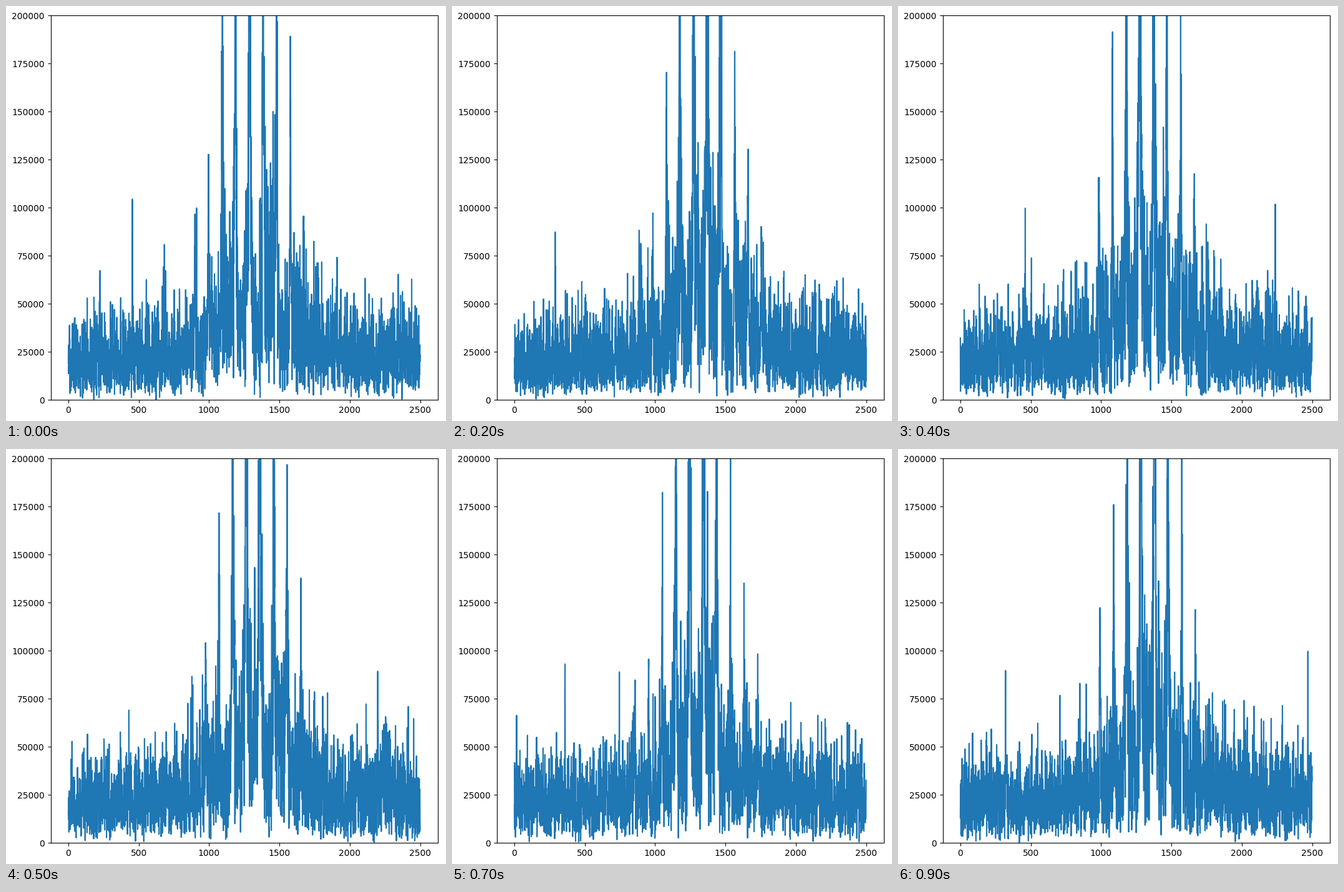
Recreate the animation shown at these times as a matplotlib script. Size 705 by 665 pixels, loop 1000 ms.

```python
import numpy as np
import matplotlib.pyplot as plt
from matplotlib.animation import FuncAnimation

WIDTH, HEIGHT, DPI = 705, 665, 100
STEPS = 10
BINS = 2500
SPACING = 96.8
HARMONICS = 10
STRAYS = 4
CENTER = 1330
LIMIT = 200_000
bins = np.arange(BINS)


def bell(x, center, width):
    return np.exp(-((x - center) / width) ** 2)


def pitch(step):
    """Bin of the lowest harmonic, gliding between a few turning points."""
    return np.interp(step, [0, 1, 3, 7, 9], [899, 877, 897, 858, 895])


def tones(step, rng):
    """Yield (bin, height, half-width) for the harmonics and a few stray tones."""
    for k in range(HARMONICS):
        position = pitch(step) + SPACING * k
        height = 75_000 + 420_000 * bell(position, CENTER, 220)
        yield round(position), height * rng.uniform(0.85, 1.15), 3.6
    for _ in range(STRAYS):
        yield rng.integers(BINS), rng.uniform(70_000, 105_000), 1.3


def spectrum(step):
    rng = np.random.default_rng(40 + step)
    sigma = 17_000 + 6_000 * bell(bins, 1500, 700) + 7_000 * bell(bins, CENTER, 220)
    signal = sigma * (rng.normal(size=BINS) + 1j * rng.normal(size=BINS))
    flutter = rng.uniform(0.3, 1, BINS)
    peaks = list(tones(step, rng))
    for center, height, width in peaks:
        phase = np.exp(2j * np.pi * rng.random())
        signal += height * flutter * phase / (1 + 1j * (bins - center) / width)
    level = np.abs(signal)
    for center, height, width in peaks:
        near = np.abs(bins - center) <= 3 * width
        level[near] = np.minimum(level[near], height)
        level[center] = height
    return level


fig = plt.figure(figsize=(WIDTH / DPI, HEIGHT / DPI), dpi=DPI, facecolor="white")
ax = fig.add_axes([71.72 / WIDTH, 33.72 / HEIGHT, 620 / WIDTH, 616 / HEIGHT])
line, = ax.plot(bins, np.zeros(BINS), color="#1f77b4", linewidth=1.5)
margin = 0.05 * (BINS - 1)
ax.set_xlim(-margin, BINS - 1 + margin)
ax.set_ylim(0, LIMIT)


def draw(step):
    line.set_ydata(spectrum(step))
    return line,


anim = FuncAnimation(fig, draw, frames=STEPS, interval=100, repeat=True)
plt.show()
```
